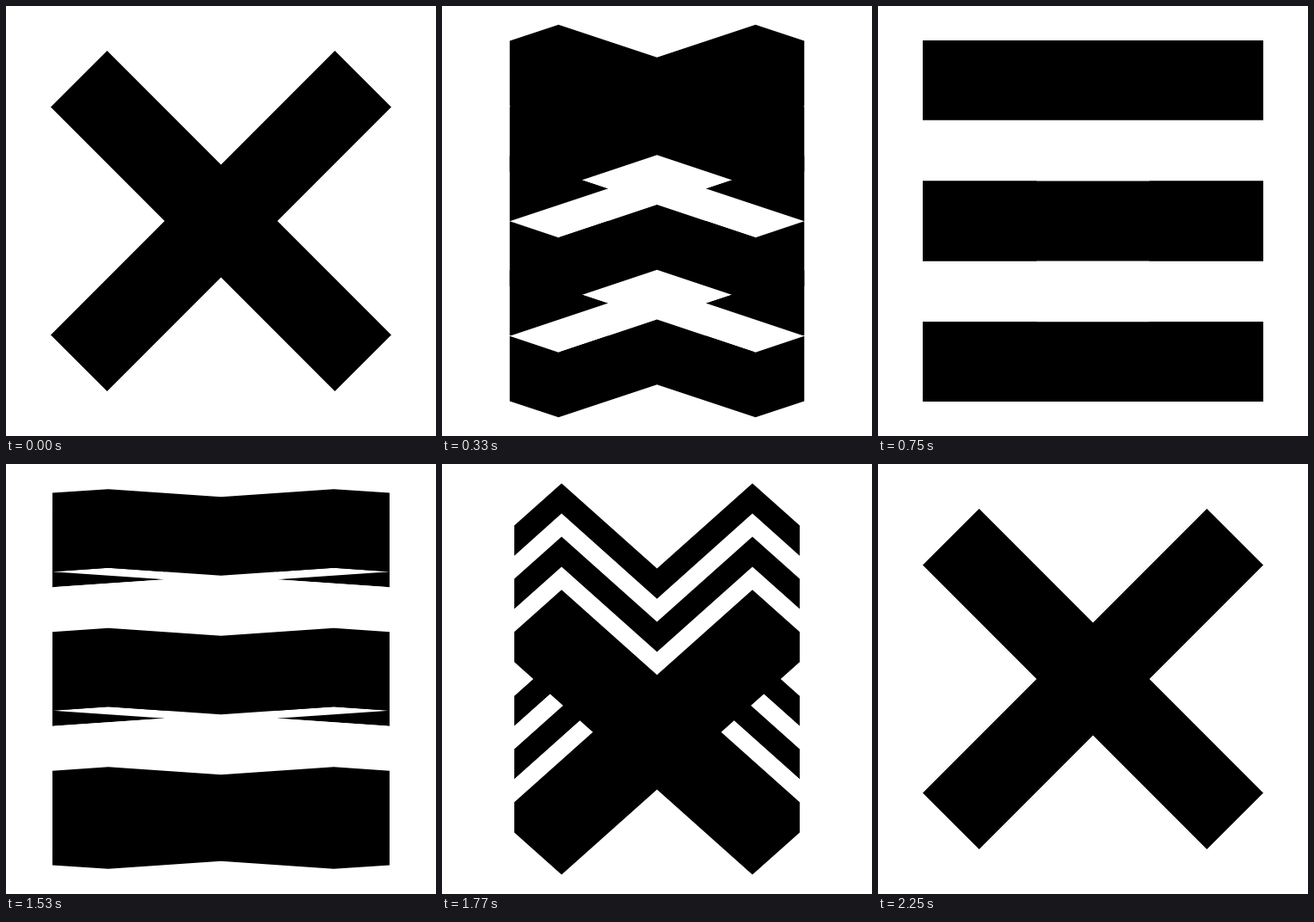
These frames come from a looping animation (500x500 px, 3 s). An HTML page with a canvas:

```html
<!DOCTYPE html>
<html lang="en">
<head>
<meta charset="utf-8">
<title>Menu and close</title>
<style>
html, body { margin: 0; width: 100%; height: 100%; overflow: hidden; background: #fff; }
canvas { display: block; }
</style>
</head>
<body>
<canvas id="stage" width="500" height="500"></canvas>
<script>
// Three stacked cross-shaped slabs: a cross from above or below, three bars from the side.
const ctx = document.getElementById('stage').getContext('2d');
const LOOP = 3000, TURN = 750, STEP = 30;
const R = 198, N = 65.6, A = R - N;
const THICK = N * Math.SQRT2, PITCH = (420 - THICK) / 2;

const face = [[-R, -A], [-A, -R], [0, -N], [A, -R], [R, -A], [N, 0],
              [R, A], [A, R], [0, N], [-A, R], [-R, A], [-N, 0]];
const rearWalls = [[[-R, -A], [-N, 0]], [[N, 0], [R, -A]]];
const front = [[-R, A], [-A, R], [0, N], [A, R], [R, A]];
const frontWalls = front.slice(1).map((p, i) => [front[i], p]);

function bezier(x1, y1, x2, y2) {
  const at = (t, a, b) => 3 * t * (1 - t) * ((1 - t) * a + t * b) + t * t * t;
  return x => {
    let lo = 0, hi = 1;
    for (let i = 0; i < 30; i++) {
      const mid = (lo + hi) / 2;
      if (at(mid, x1, x2) < x) lo = mid; else hi = mid;
    }
    return at((lo + hi) / 2, y1, y2);
  };
}

// Smooth curve through points, level at both ends.
function spline(pts) {
  const last = pts.length - 1;
  const chord = i => (pts[i + 1][1] - pts[i][1]) / (pts[i + 1][0] - pts[i][0]);
  const slope = pts.map((p, i) => {
    if (i === 0 || i === last) return 0;
    const l = p[0] - pts[i - 1][0], r = pts[i + 1][0] - p[0];
    return (chord(i - 1) * r + chord(i) * l) / (l + r);
  });
  return x => {
    let i = 0;
    while (i < last - 1 && x > pts[i + 1][0]) i++;
    const [x0, y0] = pts[i], [x1, y1] = pts[i + 1];
    const w = x1 - x0, t = (x - x0) / w, q = 1 - t;
    return y0 * (1 + 2 * t) * q * q + slope[i] * w * t * q * q +
           y1 * t * t * (3 - 2 * t) - slope[i + 1] * w * t * t * q;
  };
}

const ease = bezier(0.11, 0, 0.13, 0.96);
const shrink = spline([[0, 0], [0.04, 0.01], [0.08, 0.075], [0.12, 0.13], [0.16, 0.165],
                       [0.24, 0.197], [0.36, 0.162], [0.68, 0.053], [1, 0]]);

function fill(color, build) {
  ctx.fillStyle = color;
  ctx.beginPath();
  build();
  ctx.fill();
}

function polygon(pts) {
  pts.forEach(([x, y], i) => i ? ctx.lineTo(x, y) : ctx.moveTo(x, y));
  ctx.closePath();
}

function drawSlab(y, s, c, solid) {
  const put = ([px, py]) => [px, y + py * s];
  const drop = ([px, py]) => [px, y + py * s + THICK * c];
  const wall = ([p, q]) => polygon([put(p), put(q), drop(q), drop(p)]);
  const top = () => polygon(face.map(put));
  if (solid) {
    fill('#000', () => {
      top();
      rearWalls.forEach(wall);
      frontWalls.forEach(wall);
    });
  } else {
    fill('#000', () => rearWalls.forEach(wall));
    fill('#fff', top);
    fill('#000', () => frontWalls.forEach(wall));
  }
}

function draw(time) {
  const clock = Math.floor(((time + 4) % LOOP) / STEP) * STEP;
  const closing = clock >= 2 * TURN;
  const u = Math.min(1, (clock - (closing ? 2 * TURN : 0)) / TURN);
  const angle = (u < 1 ? ease(u) : 1) * Math.PI / 2;
  const sin = Math.sin(angle), cos = Math.cos(angle);
  const [s, c] = closing ? [sin, cos] : [cos, sin];
  const scale = 1 - shrink(u);

  ctx.setTransform(1, 0, 0, 1, 0, 0);
  ctx.fillStyle = '#fff';
  ctx.fillRect(0, 0, 500, 500);
  ctx.translate(250, 250);
  ctx.scale(scale, closing ? -scale : scale);
  for (let k = 1; k >= -1; k--) drawSlab((k * PITCH - THICK / 2) * c, s, c, k === -1);
}

let start = null;
function tick(now) {
  if (start === null) start = now;
  draw(now - start);
  requestAnimationFrame(tick);
}
draw(0);
requestAnimationFrame(tick);
</script>
</body>
</html>
```
